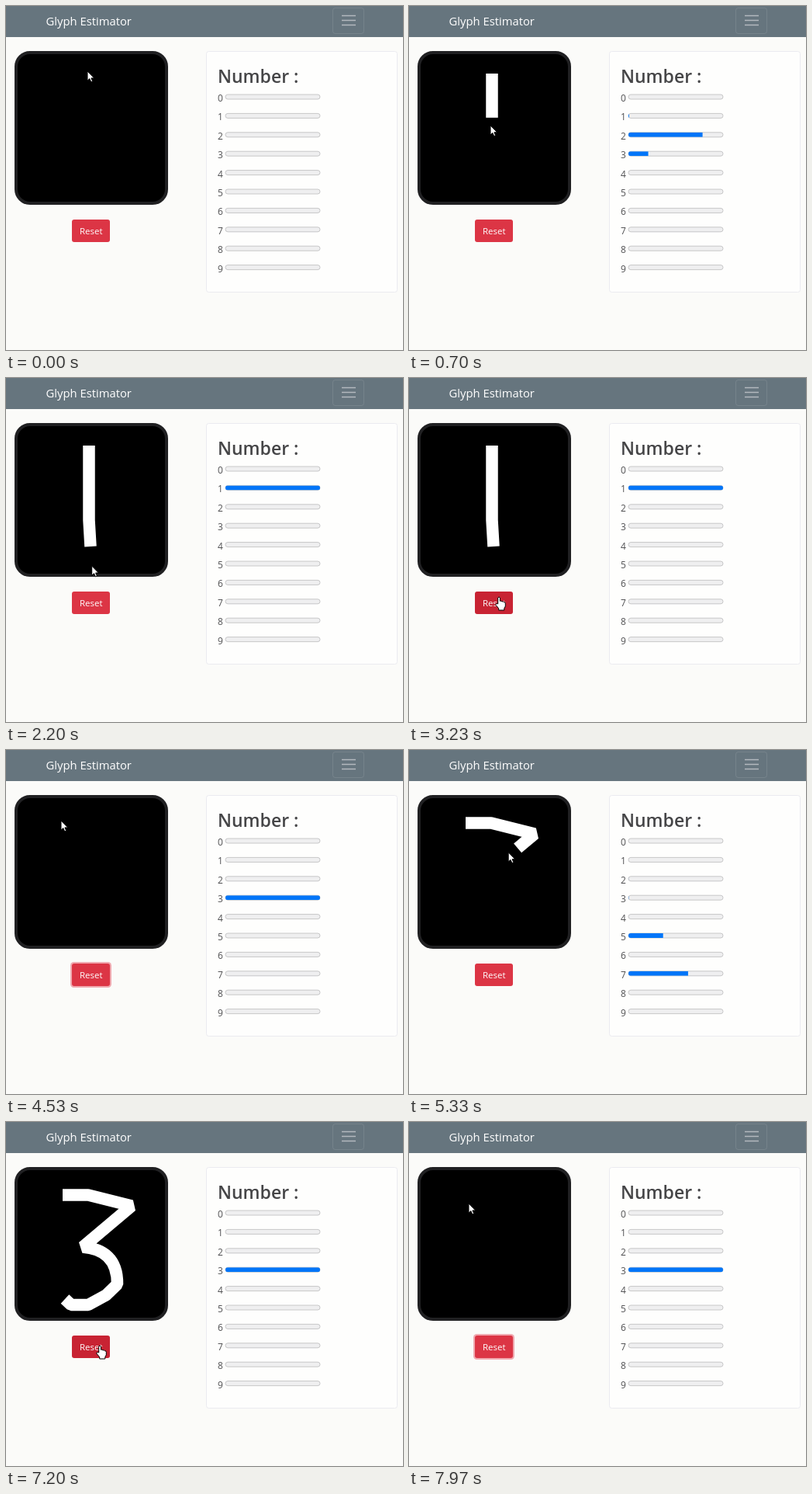
These frames come from a looping animation (512x443 px, 8000 ms). An HTML page:

```html
<!DOCTYPE html>
<html lang="en">
<head>
<meta charset="utf-8">
<title>Digit demo</title>
<style>
  html, body { margin: 0; width: 100%; height: 100%; overflow: hidden; background: #fbfbf9; }
  svg { display: block; width: 100%; height: 100%; font-family: "Open Sans", "Noto Sans", sans-serif; }
  .label { font-size: 12px; fill: #505052; }
  .ink { fill: none; stroke: #fff; stroke-width: 15.5; stroke-linejoin: bevel; }
  .cursor { fill: #fff; stroke: #000; stroke-linejoin: round; }
</style>
</head>
<body>
<svg viewBox="0 0 512 443">
  <rect width="512" height="443" fill="#fbfbf9"/>
  <rect width="512" height="40" fill="#66757e"/>
  <text x="51.5" y="24.5" font-size="14.8" fill="#fff">Glyph Estimator</text>
  <rect x="421.500" y="2.500" width="40" height="33" rx="3" fill="none" stroke="#fff" stroke-opacity=".1"/>
  <path d="M433 12.500h18M433 18.500h18M433 24.500h18" stroke="#b3b9be" stroke-width="1.4"/>

  <rect x="13" y="60" width="194" height="194" rx="18" stroke="#202022" stroke-width="4"/>
  <path id="one" class="ink" d="M107 87V183L109 217"/>
  <path id="three" class="ink" d="M73 94H106L162 108L99 161C125 163 144 176 143.500 209L129 223L106 235.500H84L76 228"/>

  <rect id="ring" x="83" y="273" width="53" height="33" rx="4.500" fill="#f0a9b0"/>
  <rect id="button" x="85" y="275" width="49" height="29" rx="3"/>
  <text x="109.7" y="293.7" font-size="11.5" fill="#fff" text-anchor="middle">Reset</text>

  <rect x="258.500" y="58.500" width="246" height="310" rx="3" fill="#fefefd" stroke="#ebebf0"/>
  <text x="273" y="99" font-size="23" font-weight="600" fill="#454547">Number :</text>
  <g id="bars"></g>

  <path id="arrow" class="cursor" d="M0 0V12.200L2.800 9.600L4.700 13.800L6.700 12.900L4.900 8.900H8.700Z"/>
  <path id="hand" class="cursor" d="M-1.300 9V1Q0 -1 1.400 1V5.300Q3 4.500 4 6Q5.700 5.200 6.400 6.800Q8.300 6.300 8.300 8.300V12L6.800 14.600V17H-.300V14.800L-4 10.300Q-4.200 7.600 -1.300 9Z"/>
</svg>
<script>
const LOOP = 8000, TICK = 100 / 3, BAR_X = 283, BAR_W = 122;
const BLANK_GUESS = 3, INK_LAG = 13;

const $ = id => document.getElementById(id);
const clamp = x => Math.max(0, Math.min(1, x));
const ease = x => x * x * (3 - 2 * x);
const glide = (a, b, x) => a.map((v, i) => v + (b[i] - v) * ease(clamp(x)));
const show = (node, on) => node.setAttribute("visibility", on ? "visible" : "hidden");

function svgNode(tag, attrs, parent) {
  const node = document.createElementNS("http://www.w3.org/2000/svg", tag);
  for (const key in attrs) node.setAttribute(key, attrs[key]);
  return parent.appendChild(node);
}

const fills = Array.from({ length: 10 }, (_, digit) => {
  const y = 114 + digit * 24.4, group = $("bars");
  const shape = { x: BAR_X, y, width: BAR_W, height: 6, rx: 3 };
  svgNode("text", { class: "label", x: 273, y: y + 9 }, group).textContent = digit;
  svgNode("rect", { ...shape, fill: "#efeff0", stroke: "#bbbbbd", "stroke-width": .8 }, group);
  const clip = svgNode("clipPath", { id: "clip" + digit }, group);
  svgNode("rect", shape, clip);
  return svgNode("rect", { x: BAR_X, y, height: 6, fill: "#0075f8", "clip-path": `url(#clip${digit})` }, group);
});

// Each stroke passes through its guesses in order and reaches the last one at "settle"
const strokes = [
  { path: $("one"), start: 250, end: 1280, settle: 1500, reset: 3360, guesses: [3, 2, 1], button: [116, 282] },
  { path: $("three"), start: 4640, end: 6445, settle: 6513, reset: 7360, guesses: [3, 7, 5, 2, 3], button: [121, 288] }
];

function tipAt(path, distance) {
  const p = path.getPointAtLength(distance);
  return [p.x - 2, p.y - 3];
}
strokes.forEach((s, i) => {
  s.length = s.path.getTotalLength();
  s.next = strokes[i + 1] ? tipAt(strokes[i + 1].path, 0) : [77, 105];
});

function pointerAt(t, s) {
  if (t < s.start) return tipAt(s.path, 0);
  if (t < s.end) return tipAt(s.path, (t - s.start) / (s.end - s.start) * s.length + INK_LAG);
  if (t < s.reset) return glide(tipAt(s.path, s.length), s.button, (t - s.end - 200) / (s.reset - s.end - 450));
  return glide(s.button, s.next, (t - s.reset - 200) / 380);
}

// Softmax over the guesses, centred on how far the stroke has come
function sharesAt(t, s) {
  const shares = Array(10).fill(0);
  if (t < s.start) return shares;
  if (t >= s.reset) return shares.fill(1, BLANK_GUESS, BLANK_GUESS + 1);
  const place = (t - s.start) / (s.settle - s.start) * (s.guesses.length - 1);
  const weights = s.guesses.map((_, i) => Math.exp(-3 * (place - i) ** 2));
  const total = weights.reduce((a, b) => a + b);
  s.guesses.forEach((digit, i) => shares[digit] += weights[i] / total);
  return shares;
}

function render(t) {
  const current = strokes.filter(s => t >= s.start).pop() || strokes[0];
  for (const s of strokes) {
    const drawn = clamp((t - s.start) / (s.end - s.start)) * s.length;
    s.path.setAttribute("stroke-dasharray", `${drawn} ${s.length + 1}`);
    show(s.path, drawn > 0 && t < s.reset);
  }

  const shares = sharesAt(t, current);
  fills.forEach((fill, digit) => fill.setAttribute("width", BAR_W * shares[digit]));

  const [x, y] = pointerAt(t, current);
  const hover = x > 85 && x < 134 && y > 275 && y < 304;
  for (const id of ["arrow", "hand"]) $(id).setAttribute("transform", `translate(${x} ${y})`);
  show($("hand"), hover);
  show($("arrow"), !hover);
  $("button").setAttribute("fill", hover ? "#c82333" : "#dc3545");
  show($("ring"), t >= current.reset);
}

const origin = performance.now();
function frame() {
  const t = (performance.now() - origin) % LOOP;
  render(Math.floor(t / TICK) * TICK);
  requestAnimationFrame(frame);
}
render(0);
requestAnimationFrame(frame);
</script>
</body>
</html>
```
